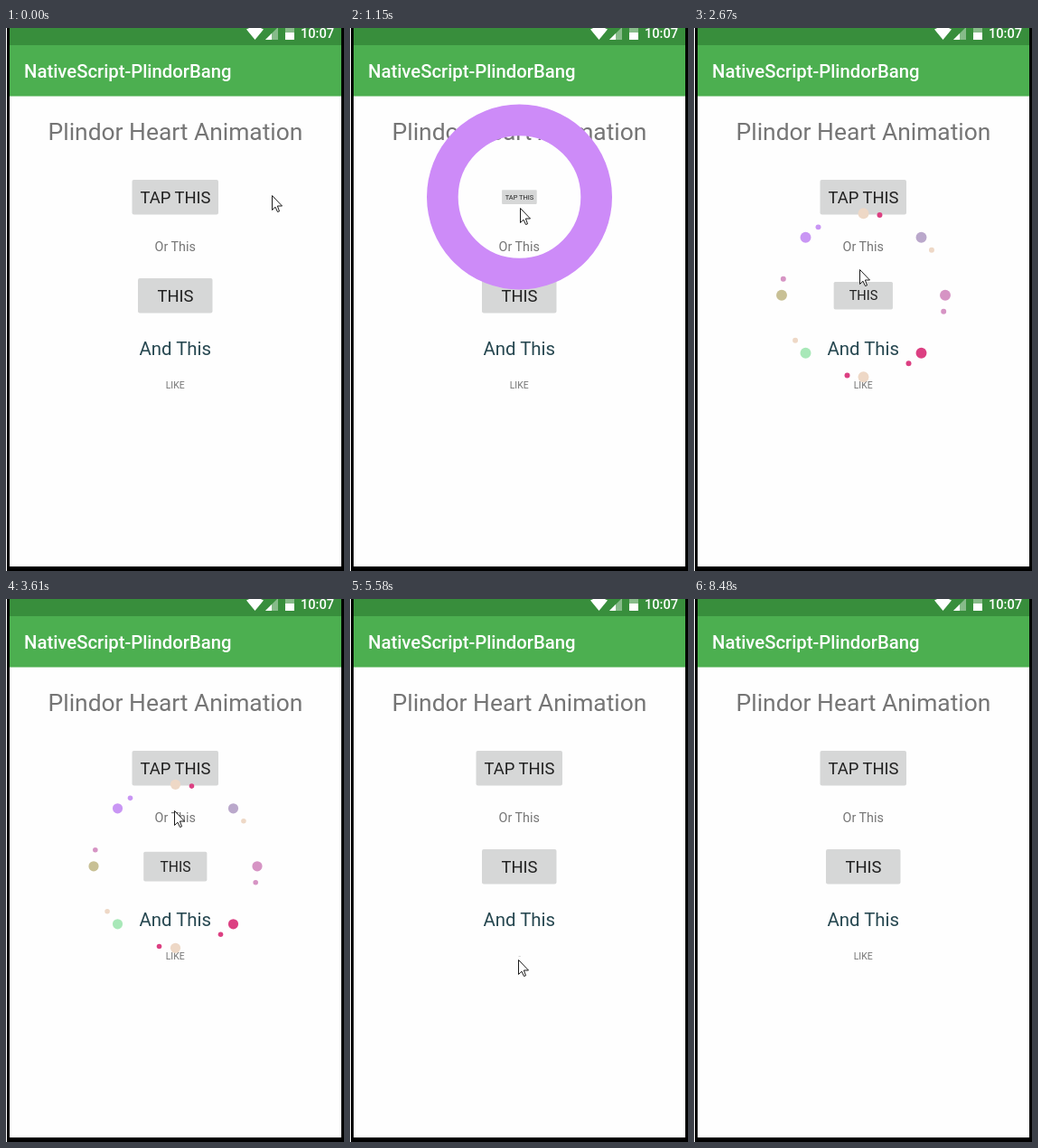
An HTML page for the animation above (8.75 s loop, 374 px wide and 601 px high).

```html
<!DOCTYPE html>
<html lang="en">
<head>
<meta charset="utf-8">
<title>Heart animation</title>
<style>
  html, body { margin: 0; width: 100%; height: 100%; overflow: hidden; background: #000; }
  svg { display: block; width: 374px; height: 601px; }
  text { font-family: Roboto, Arial, sans-serif; }
  .mid { text-anchor: middle; }
  .btn rect { fill: #d6d7d7; }
  .btn text { font-size: 18.4px; fill: #202020; }
  .grey { fill: #757575; }
</style>
</head>
<body>
<svg viewBox="0 0 374 601">
  <rect width="374" height="601" fill="#000"/>
  <rect width="1" height="601" fill="#fefefe"/>
  <rect x="4" width="367" height="596" fill="#fefefe"/>
  <rect x="4" width="367" height="19" fill="#388e3c"/>
  <rect x="4" y="19" width="367" height="56.5" fill="#4caf50"/>

  <g fill="#fff">
    <path d="M266 1.5Q275.5 -4 285 1.5L275.5 13Z"/>
    <path d="M287 13L301 -1V13Z" opacity=".4"/>
    <path d="M287 13L294 6V13Z"/>
    <rect x="309" width="10" height="5" opacity=".4"/>
    <rect x="309" y="5" width="10" height="8"/>
    <text x="326" y="11" font-size="14.6" font-weight="500">10:07</text>
    <text x="20" y="55" font-size="20.3" font-weight="500">NativeScript-PlindorBang</text>
  </g>

  <text class="mid grey" x="187.5" y="124" font-size="26.4">Plindor Heart Animation</text>
  <text class="mid grey" x="187.2" y="247" font-size="14.3">Or This</text>

  <g id="tap" class="btn">
    <rect x="139.5" y="168" width="95.5" height="38.5" rx="2"/>
    <text class="mid" x="187.5" y="194">TAP THIS</text>
  </g>
  <g id="this" class="btn">
    <rect x="146" y="277" width="82.5" height="38.5" rx="2"/>
    <text class="mid" x="187.5" y="303">THIS</text>
  </g>
  <g id="and"><text class="mid" x="187.3" y="362" font-size="20.4" fill="#264750">And This</text></g>
  <g id="like"><text class="mid grey" x="187.2" y="399" font-size="10.4">LIKE</text></g>

  <g id="bursts"></g>
  <path id="cursor" d="M.5 .5V16.5L4 13.2L6.5 18.5L8.5 17.8L6.4 12H11.5Z"
        fill="#fff" stroke="#1b1b1b" stroke-linejoin="round"/>
</svg>
<script>
const LOOP = 8750;
const STEP = 88;    // the picture advances in even steps
const LEAD = 120;   // a tapped part shrinks this long before its burst
const LIFE = 1000;
const CX = 187.5;

// Pointer tip: time, x, y
const PATH = [
  [90, 294, 185], [540, 188, 204], [1144, 188, 199], [1680, 187, 324],
  [2040, 187, 300], [2640, 183, 267], [3080, 185, 295], [3970, 187, 192],
  [4250, 187, 351], [4576, 188, 371], [5400, 186, 399], [7800, 186, 399],
  [8210, 313, 561], [8440, 322, 640]
];

// Tapped parts: centre, burst radius, burst start times
const PARTS = [
  { id: "tap", y: 187, r: 102.5, starts: [908] },
  { id: "this", y: 295.8, r: 90.5, starts: [2240, 3170] },
  { id: "and", y: 354, r: 80.8, starts: [4496] },
  { id: "like", y: 395.3, r: 20.5, starts: [5640, 6578, 7470] }
];

const pink = "#d694c4", crimson = "#dc4082", peach = "#eed8c6", violet = "#c996f4";
const BIG = [pink, crimson, peach, "#a8e8b8", "#c8c095", violet, peach, "#baa8cb"];
const SMALL = [pink, crimson, crimson, peach, pink, violet, crimson, peach];

const $ = id => document.getElementById(id);
const clamp = v => Math.max(0, Math.min(1, v));
const span = (a, b, v) => clamp((v - a) / (b - a));
const mix = (a, b, k) => a + (b - a) * k;

function disc(x, y, r, paint) {
  return `<circle cx="${x}" cy="${y}" r="${r}" ${paint}/>`;
}

function dots(y, r, size, turn, colors) {
  return colors.map((color, i) => {
    const a = i * Math.PI / 4 + turn;
    return disc(CX + r * Math.cos(a), y + r * Math.sin(a), size, `fill="${color}"`);
  }).join("");
}

// Growing disc, then thinning ring, then two circles of shrinking dots
function burst({ y, r }, p) {
  if (p <= 0 || p >= 1) return "";
  if (p < 0.15) {
    const k = p / 0.15;
    const rgb = [mix(223, 205, k), mix(66, 139, k), mix(136, 248, k)].map(Math.round);
    return disc(CX, y, r * k, `fill="rgb(${rgb})"`);
  }
  if (p < 0.28) {
    const k = span(0.15, 0.28, p);
    return disc(CX, y, r * (1 + k) / 2,
      `fill="none" stroke="#cd8bf8" stroke-width="${r * (1 - k)}"`);
  }
  const size = 0.09 * r * (1 - span(0.18, 1, p));
  return dots(y, r, size, 0, BIG) + dots(y, r, size / 2, 0.2, SMALL);
}

// Return from a tenth of the size with a slight overshoot
function pop(p) {
  const s = span(0.15, 1.05, p) - 1;
  return mix(0.1, 1, s * s * (2 * s + 1) + 1);
}

function tipAt(t) {
  const next = PATH.findIndex(k => k[0] > t);
  const b = PATH.at(next);
  const a = next > 0 ? PATH[next - 1] : b;
  const k = a === b ? 0 : span(a[0], b[0], t);
  return [mix(a[1], b[1], k), mix(a[2], b[2], k)].map(Math.round);
}

function draw(now) {
  const t = Math.floor(now / STEP) * STEP;
  let shapes = "";
  for (const part of PARTS) {
    const start = part.starts.findLast(s => s - LEAD <= t);
    const p = start ? (t - start) / LIFE : 2;
    $(part.id).setAttribute("transform",
      `translate(${CX} ${part.y}) scale(${pop(p)}) translate(${-CX} ${-part.y})`);
    shapes += burst(part, p);
  }
  $("bursts").innerHTML = shapes;
  $("cursor").setAttribute("transform", `translate(${tipAt(t)})`);
}

const begin = performance.now();
function tick() {
  draw((performance.now() - begin) % LOOP);
  requestAnimationFrame(tick);
}
tick();
</script>
</body>
</html>
```
